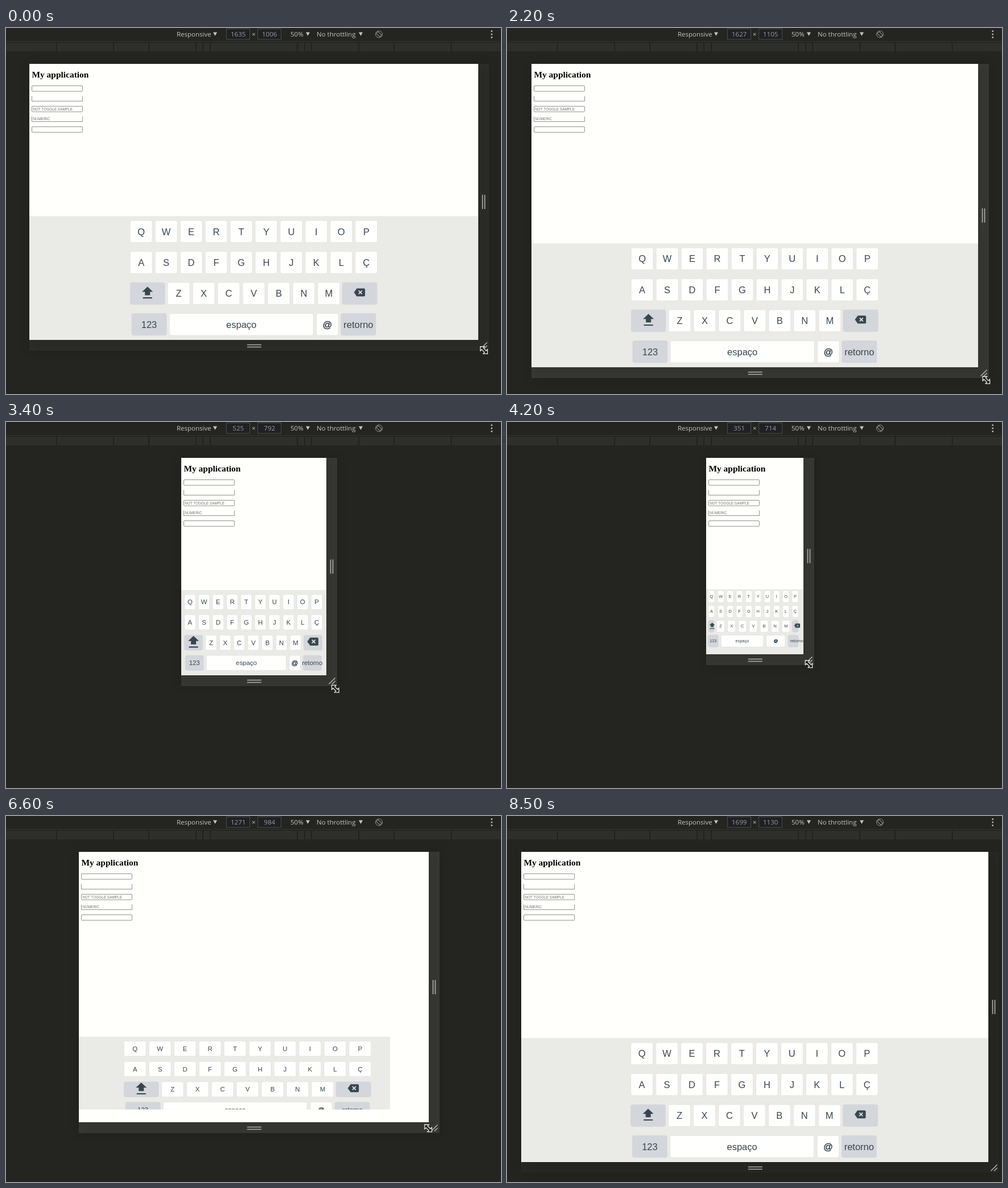
An HTML page that plays this animation: 870x643 px, repeating every 9 s.

```html
<!DOCTYPE html>
<html>
<head>
<meta charset="utf-8">
<style>
html, body { margin: 0; width: 100%; height: 100%; overflow: hidden; background: #242521; }
svg { display: block; }
text { white-space: pre; }
.ui { font: 11.5px "Open Sans", "Noto Sans", sans-serif; fill: #c4c5c1; }
.num { fill: #989b9f; text-anchor: middle; }
.tip { font: 13.1px "Open Sans", "Noto Sans", sans-serif; fill: #3a3a3a; text-anchor: end; }
.title { font: bold 15.46px "Liberation Serif", "Times New Roman", serif; }
.key { font-family: "Liberation Sans", Arial, sans-serif; fill: #37474f; text-anchor: middle; }
.hint { font: 6.44px "Liberation Sans", Arial, sans-serif; fill: #757575; }
</style>
</head>
<body>
<svg id="stage" width="870" height="643" viewBox="0 0 870 643"></svg>
<script>
const NS = 'http://www.w3.org/2000/svg';
const LOOP = 9000, STEP = 100, SCALE = 0.4825, CX = 435.5, TOP = 63, BAR = 19;

const easeIn = p => u => u ** p;
const easeOut = p => u => 1 - (1 - u) ** p;
const linear = easeIn(1);

// each drag of the corner: start, end, viewport width and height reached, easing
const DRAGS = [
  [800, 1000, 1637, 1018, linear],
  [1400, 1900, 1662, 1124, easeIn(2.8)],
  [2000, 2600, 1343, 956, easeIn(2)],
  [2600, 3000, 743, 890, linear],
  [3000, 4200, 351, 714, easeOut(2)],
  [4200, 4600, 313, 670, linear],
  [5100, 5500, 321, 666, linear],
  [5700, 6000, 391, 686, easeIn(2)],
  [6000, 6600, 1271, 984, easeIn(1.6)],
  [6600, 6900, 1699, 1130, easeOut(1.5)]
];

const clamp = u => Math.max(0, Math.min(1, u));

function sizeAt(t) {
  let w = 1635, h = 1006;
  for (const [start, end, toW, toH, ease] of DRAGS) {
    const u = ease(clamp((t - start) / (end - start)));
    w += (toW - w) * u;
    h += (toH - h) * u;
  }
  return { w, h };
}

function set(el, attrs) {
  for (const name in attrs) el.setAttribute(name, attrs[name]);
  return el;
}
function add(parent, tag, attrs, content) {
  const el = set(document.createElementNS(NS, tag), attrs);
  if (content !== undefined) el.textContent = content;
  return parent.appendChild(el);
}
const rect = (parent, x, y, width, height, fill, more) =>
  add(parent, 'rect', { x, y, width, height, fill, ...more });
const label = (parent, x, y, content, cls) => add(parent, 'text', { x, y, class: cls }, content);

const stage = document.getElementById('stage');
const blur = add(add(stage, 'defs'), 'filter', { id: 'soft', x: '-20%', y: '-20%', width: '140%', height: '140%' });
add(blur, 'feGaussianBlur', { stdDeviation: 9 });

rect(stage, 0, 0, 870, 643, '#242521');
const shadow = rect(stage, 0, TOP, 1, 1, '#000', { opacity: 0.14, filter: 'url(#soft)' });

// toolbar
rect(stage, 0, 0, 870, 23, '#242521');
rect(stage, 0, 23, 870, 1, '#353632');
rect(stage, 0, 26, 870, 15, '#2e2f2b');
for (const d of [76.5, 89.5, 101.5, 184.5, 246.5, 347])
  for (const side of [-1, 1]) rect(stage, CX + side * d - 0.6, 26, 1.3, 15, '#1c1d1a');
label(stage, 300, 15, 'Responsive', 'ui');
label(stage, 432, 15, '×', 'ui');
label(stage, 500, 15, '50%', 'ui');
label(stage, 546, 15, 'No throttling', 'ui');
for (const x of [367.5, 530.5, 623.5])
  add(stage, 'path', { d: `M${x - 3.5} 7.5h7l-3.5 6.3z`, fill: '#c4c5c1' });
const counts = [387.5, 442.5].map(x => {
  rect(stage, x, 1.5, 41, 18.5, '#202124', { stroke: '#4b4c49' });
  return label(stage, x + 20.7, 15, '', 'ui num');
});
const turn = add(stage, 'g', { transform: 'translate(655.5 11)', fill: 'none', stroke: '#8f908c' });
add(turn, 'circle', { r: 6 });
rect(turn, -2.3, -4.5, 4.6, 9, 'none', { transform: 'rotate(-45)' });
for (const y of [5.5, 11, 16.5]) add(stage, 'circle', { cx: 853.7, cy: y, r: 1.5, fill: '#b5b6b2' });

// resizers
const rightBar = rect(stage, 0, TOP, BAR, 1, '#fff');
const bottomBar = rect(stage, 0, 0, 1, BAR, '#fff');
const grip = d => add(stage, 'path', { d, fill: 'none', stroke: '#aeafab', 'stroke-width': 1.6 });
const rightGrip = grip('M-2-12.5v25M2-12.5v25');
const bottomGrip = grip('M-12.5-2h25M-12.5 2h25');
const cornerGrip = grip('M-5.5 5.5l11-11M0 5.7l5.7-5.7');

// page
const page = add(stage, 'svg', { y: TOP, overflow: 'hidden' });
rect(page, 0, 0, '100%', '100%', '#fffffc');
label(page, 4.4, 24, 'My application', 'title');
for (let i = 0; i < 5; i++) {
  const y = 38.5 + 18 * i, open = i % 2;
  add(page, 'path', {
    d: open ? `M4.5 ${y}v9h89v-9` : `M6 ${y}h86q1.5 0 1.5 1.5v6.7q0 1.5-1.5 1.5h-86q-1.5 0-1.5-1.5v-6.7q0-1.5 1.5-1.5z`,
    fill: 'none', stroke: '#858585', 'stroke-width': 0.9
  });
}
label(page, 6.2, 81.8, 'NOT TOGGLE SAMPLE', 'hint');
label(page, 6.2, 99.2, 'NUMERIC', 'hint');
const sizeTip = label(page, 0, 17, '', 'tip');

// keyboard
const board = add(page, 'svg', { overflow: 'hidden' });
const tray = rect(board, 0, 0, '100%', 1, '#eaebe7');
const ICONS = {
  up: 'M0-12L9.5-3H4.5V3H-4.5V-3H-9.5zM-8 6.7H8V8.8H-8z',
  back: 'M-10-2L-5-9H7.5Q9.5-9 9.5-7V3Q9.5 5 7.5 5H-5z'
};
const keys = [];

// wide and tight: left and right ends in column units
function addKey(row, text, wide, tight = wide, dark = false) {
  const cap = rect(board, 0, 0, 1, 1, dark ? '#d3d6db' : '#fffffd',
    { rx: 3, stroke: dark ? '#d3d6db' : '#e0e1dc', 'stroke-width': 0.7 });
  const icon = ICONS[text];
  const face = icon ? add(board, 'g', { fill: '#37474f' }) : label(board, 0, 0, text, 'key');
  if (icon) add(face, 'path', { d: icon });
  if (text === 'back')
    add(face, 'path', { d: 'M-1.8-5l6 6m0-6l-6 6', stroke: '#e4e6e9', 'stroke-width': 1.7 });
  if (text === '@') set(face, { stroke: '#37474f', 'stroke-width': 0.5 });
  keys.push({ row, text, icon, wide, tight, cap, face });
}
['QWERTYUIOP', 'ASDFGHJKLÇ'].forEach((line, row) =>
  [...line].forEach((c, i) => addKey(row, c, [i, i + 1])));
addKey(2, 'up', [0, 1.5], [0, 0.95], true);
[...'ZXCVBNM'].forEach((c, i) =>
  addKey(2, c, [i + 1.5, i + 2.5], [0.9 + i * 1.17, 2.07 + i * 1.17]));
addKey(2, 'back', [8.48, 9.99], [9.03, 10], true);
addKey(3, '123', [0.06, 1.57], [-0.05, 1.4], true);
addKey(3, 'espaço', [1.57, 7.44], [1.37, 6.25]);
addKey(3, '@', [7.45, 8.44], [6.25, 8.58]);
addKey(3, 'retorno', [8.43, 9.94], [8.57, 10], true);

// row metrics per viewport width
function metrics(w) {
  if (w < 380) return { total: 113.7, first: 13, pitch: 26, height: 21, font: 7.4 };
  if (w < 480) return { total: 89, first: 12, pitch: 24.2, height: 18.7, font: 7.4 };
  if (w < 1300) return { total: 150, first: 21, pitch: 35.7, height: 26.5, font: 11.4 };
  return { total: 218, first: 27.2, pitch: 54.4, height: 38.5, font: 16.5 };
}

function layKeys(w, h) {
  const m = metrics(w), tight = w < 480;
  const width = w * SCALE, top = h * SCALE - m.total;
  const col = Math.min(43.95, (width - 6) / 10);
  const x0 = tight ? 1.3 : width / 2 - col * 5;
  set(tray, { y: top, height: m.total });
  for (const k of keys) {
    const [a, b] = tight ? k.tight : k.wide;
    const left = x0 + a * col + 2.6, wide = Math.max(4, (b - a) * col - 5.2);
    const y = top + m.first + k.row * m.pitch;
    let x = left + wide / 2;
    set(k.cap, { x: left, y: y - m.height / 2, width: wide, height: m.height });
    if (k.icon) {
      if (tight) x = x0 + (k.text === 'up' ? 0.57 : 9.72) * col;
      set(k.face, { transform: `translate(${x} ${y}) scale(${tight ? 0.52 : 1})` });
    } else {
      if (tight && k.text === 'retorno') x = left + 15;
      set(k.face, { x, y: y + m.font * 0.36, 'font-size': m.font });
    }
  }
}

const pointer = add(stage, 'path', {
  d: 'M-9 0L-3.5-5.3V-2H3.5V-5.3L9 0L3.5 5.3V2H-3.5V5.3z',
  fill: '#20211e', stroke: '#f4f4f0', 'stroke-width': 1.2
});

function span(w) {
  const half = w * SCALE / 2, left = Math.floor(CX - half);
  return { left, width: Math.ceil(CX + half) - left };
}

function draw(time) {
  const t = Math.floor(time / STEP) * STEP;
  const now = sizeAt(t), behind = sizeAt(t - 60), ahead = sizeAt(t + 75);
  const growing = ahead.w > now.w || now.w > behind.w;
  const fast = now.w - behind.w > 60;

  // while growing, page, keyboard and pointer run out of step with the resizers
  const shown = growing && !fast ? ahead : now;
  const raster = growing ? behind : shown;
  const laid = fast ? sizeAt(t - 18) : now;
  const held = fast ? laid : growing ? sizeAt(t + 160) : behind;

  const { left, width } = span(now.w), right = left + width;
  const height = Math.round(now.h * SCALE), bottom = TOP + height;
  const leave = clamp((t - 7900) / 600);
  const opacity = t < 900 ? 0.045 : 0.096 - 0.073 * leave;
  set(shadow, { x: left, width: width + BAR, height: height + BAR });
  set(rightBar, { x: right, height: height + BAR, opacity });
  set(bottomBar, { x: left, y: bottom, width, opacity });
  set(rightGrip, { transform: `translate(${right + 9.5} ${TOP + height / 2})` });
  set(bottomGrip, { transform: `translate(436.3 ${bottom + 10.5})` });
  set(cornerGrip, { transform: `translate(${right + 10} ${bottom + 10})` });

  const view = span(shown.w), viewH = Math.round(shown.h * SCALE);
  set(page, { x: view.left, width: view.width, height: viewH });
  set(board, {
    width: growing ? raster.w * SCALE : view.width,
    height: growing ? raster.h * SCALE : viewH
  });
  layKeys(laid.w, now.h);

  counts[0].textContent = Math.round(now.w);
  counts[1].textContent = Math.round(now.h);
  sizeTip.textContent = t >= 900 && t < 2100
    ? `${Math.floor(now.w / 2)}px × ${Math.floor(now.h / 2)}px` : '';
  set(sizeTip, { x: view.width - 4.5 });

  const x = 840 + (held.w - 1635) * SCALE / 2 + 40 * leave;
  const y = 566 + (held.h - 1006) * SCALE - 595 * leave;
  set(pointer, { transform: `translate(${x} ${y}) rotate(45)` });
}

const start = performance.now();
function tick() {
  draw((performance.now() - start) % LOOP);
  requestAnimationFrame(tick);
}
tick();
</script>
</body>
</html>
```
